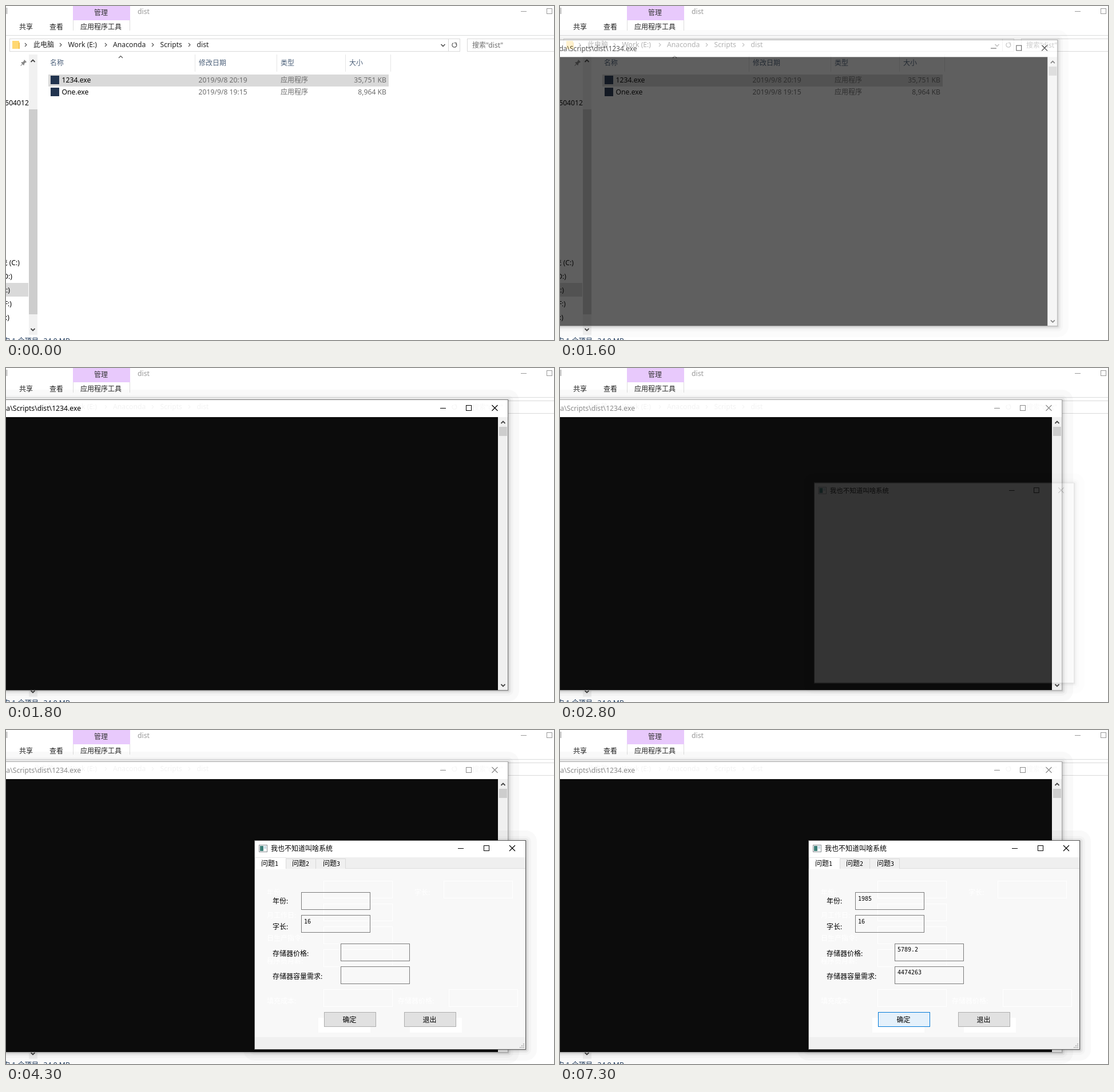
Animation, 958 px wide and 585 px high, one loop 8000 ms. Source, as an HTML page:

```html
<!DOCTYPE html>
<html lang="zh-CN">
<head>
<meta charset="utf-8">
<title>Desktop</title>
<style>
html, body { margin: 0; width: 100%; height: 100%; overflow: hidden; background: #fff; }
svg { display: block; width: 958px; height: 585px; font: 12.2px "Noto Sans", "Noto Sans CJK SC", "Noto Sans CJK", sans-serif; }
text { white-space: pre; }
.cn { font-size: 12px; font-family: "Noto Sans CJK SC", "Noto Sans CJK", sans-serif; }
.mono { font-size: 10px; font-family: "DejaVu Sans Mono", "Noto Sans Mono", monospace; }
</style>
</head>
<body>
<svg id="stage" viewBox="0 0 958 585"></svg>
<script>
const LOOP = 8000;

// ---- drawing helpers ----
const rect = (x, y, w, h, fill, extra = '') =>
  `<rect x="${x}" y="${y}" width="${w}" height="${h}" fill="${fill}" ${extra}/>`;
const box = (x, y, w, h, stroke, fill = 'none', extra = '') =>
  rect(x + .5, y + .5, w, h, fill, `stroke="${stroke}" ${extra}`);
const text = (x, y, s, fill = '#000', extra = '') =>
  `<text x="${x}" y="${y}" fill="${fill}" ${extra}>${s}</text>`;
const cn = (x, y, s, fill) => text(x, y, s, fill, 'class="cn"');
const mono = (x, y, s, extra = '') => text(x, y, s, '#000', `class="mono" ${extra}`);
const end = (x, y, s, fill) => text(x, y, s, fill, 'text-anchor="end"');
const line = (d, stroke, width = 1) =>
  `<path d="${d}" fill="none" stroke="${stroke}" stroke-width="${width}"/>`;
const group = (id, body, extra = '') => `<g id="${id}" ${extra}>${body}</g>`;

const chevrons = { right: 'm-2 -3l3 3l-3 3', up: 'm-3.5 2l3.5 -3.5l3.5 3.5', down: 'm-3.5 -2l3.5 3.5l3.5 -3.5' };
const chevron = (x, y, dir, color = '#555', width = 1.2) => line(`M${x} ${y}${chevrons[dir]}`, color, width);

// Soft shadow built from stacked rounded rings around a window
function ring(x, y, w, h, d, alpha) {
  const arc = (dx, dy) => `a${d} ${d} 0 0 1 ${dx} ${dy}`;
  return `<path fill-rule="evenodd" opacity="${alpha}" d="M${x} ${y - d + 2}h${w}${arc(d, d)}v${h - 2}` +
    `${arc(-d, d)}h${-w}${arc(-d, -d)}v${2 - h}${arc(d, -d)}zM${x} ${y}h${w}v${h}h${-w}z"/>`;
}
const shadow = (...frame) => '<g>' +
  [[19, .023], [9, .025], [5, .05], [2, .11]].map(layer => ring(...frame, ...layer)).join('') + '</g>';

// Minimise, maximise and close; each x is the left edge of its glyph
const controls = (y, min, max, close) =>
  `<g fill="none" stroke="currentColor"><path d="M${min} ${y + .5}h10"/>` +
  `<rect x="${max + .5}" y="${y - 4.5}" width="9" height="9"/>` +
  (close ? `<path d="M${close} ${y - 5}l10 10m0 -10l-10 10" stroke-width="1.2"/>` : '') + '</g>';

// ---- file browser ----
function fileRow(y, name, date, size) {
  return rect(78, y + 2, 15, 15, '#22344f') + text(97.5, y + 14, name) +
    text(336.5, y + 14, date, '#6d6d6d') + cn(480, y + 14, '应用程序', '#6d6d6d') +
    end(665, y + 14, size, '#6d6d6d');
}

function browser() {
  const ribbon = rect(117, 0, 100, 25, '#e8c9fc') + cn(154, 16, '管理', '#333') +
    line('M117.5 25v18M216.5 25v18', '#ddd') + line('M1.5 3v11', '#888') +
    cn(23, 41, '共享', '#222') + cn(76, 41, '查看', '#222') + cn(130, 41, '应用程序工具', '#222') +
    line('M0 51.5H958', '#dadbdc');
  const crumbs = [[108.5, 'Work (E:)'], [187, 'Anaconda'], [269.5, 'Scripts'], [333.5, 'dist']];
  const path = cn(48, 72, '此电脑', '#222') + crumbs.map(([x, s]) => text(x, 72, s, '#222')).join('') +
    [35, 96, 175, 257, 321].map(x => chevron(x, 68, 'right')).join('');
  const search = cn(815, 73, '搜索', '#6d6d6d') + text(839, 73, '"dist"', '#6d6d6d') +
    chevron(764, 69, 'down', '#555', 1.6) +
    line('M786.5 65.2a4 4 0 1 1 -4.5 -.5M783.5 64.5h3.5v3.5', '#555', 1.2);
  const address = box(6, 57, 787, 22, '#d9d9d9') + line('M773.5 58v21', '#d9d9d9') +
    box(806, 57, 160, 22, '#d9d9d9') + rect(11, 61, 12, 14, '#ffd873') + rect(22, 64, 2, 11, '#f3c24f') +
    group('address', path + search);
  const heads = [[77, '名称'], [337, '修改日期'], [480, '类型'], [600, '大小']];
  const header = heads.map(([x, s]) => cn(x, 104, s, '#4c607a')).join('') +
    line('M330.5 85v30M473.5 85v30M593.5 85v30M672.5 85v30', '#e5e5e5') + chevron(200.5, 89, 'up');
  const drives = [[24, 454, '系统 (C:)'], [11, 478, '(D:)'], [7, 502, '(E:)'], [10, 526, '(F:)'], [6, 550, '(G:)']];
  const nav = rect(40, 85, 15, 491, '#f1f1f1') + rect(40, 181, 15, 359, '#cdcdcd') +
    chevron(47, 96, 'up', '#444', 1.8) + chevron(47, 567, 'down', '#444', 1.8) +
    '<path d="M32 94l4 4l-1 1l-1 0l-2 2l0 2l-1 1l-2 -2l-3 3l-.7 -.7l3 -3l-2 -2l1 -1l2 0l2 -2l0 -1z" fill="#888"/>' +
    rect(0, 485, 39, 24, '#d9d9d9') + end(40, 174, '504012') +
    drives.map(([x, y, s]) => end(x, y, s)).join('');
  const status = text(-5, 591, '中 1 个项目', '#1e395b') + text(65.5, 591, '34.9 MB', '#1e395b');
  return rect(0, 0, 958, 585, '#fff') + ribbon +
    group('browserTitle', text(230, 14, 'dist', 'currentColor') + controls(9, 900, 945)) +
    address + header +
    group('selected', box(74, 120, 594, 20, 'currentColor')) +
    group('hovered', rect(74, 141, 595, 21, '#e5f3ff')) +
    fileRow(120, '1234.exe', '2019/9/8 20:19', '35,751 KB') +
    fileRow(141, 'One.exe', '2019/9/8 19:15', '8,964 KB') + nav + status;
}

// ---- console ----
function consoleWindow() {
  const body = rect(-156, 55, 1034, 510, '#fff') +
    group('addressTrace', '<use href="#address"/>', 'opacity=".05"') +
    group('consoleTitle', end(131, 75, 'E:\\Anaconda\\Scripts\\dist\\1234.exe', 'currentColor') +
      controls(70, 759, 804, 849.5)) +
    rect(-156, 86, 1016, 478, '#0c0c0c') + rect(860, 86, 17, 478, '#f0f0f0') +
    rect(862, 103, 14, 16, '#cdcdcd') + chevron(869, 95, 'up', '#444', 1.8) +
    chevron(869, 556, 'down', '#444', 1.8) + box(-156, 55, 1033, 509, '#777', 'none', 'id="consoleEdge"');
  return shadow(-156, 55, 1034, 510) + `<g>${body}</g>`;
}

// ---- dialog ----
const field = (x, y, id = '') => box(x, y, 120, 30, '#7a7a7a', 'none', id && `id="${id}"`);
const button = (x, y, label, id = '') =>
  box(x, y, 90, 25, '#adadad', '#e1e1e1', id && `id="${id}"`) + cn(x + 32.5, y + 18, label);

function tabs(edges, active) {
  return edges.slice(0, 3).map((x, i) => {
    const on = i === active, top = on ? 223 : 225, w = edges[i + 1] - x;
    return rect(x, top, w, (on ? 244 : 243) - top, on ? '#fff' : '#f0f0f0') +
      line(`M${x + .5} 243V${top + .5}H${x + w + .5}V243`, on ? '#e6e6e6' : '#d9d9d9') +
      cn(446 + i * 54, 238, '问题') + mono(470 + i * 54, 238, i + 1);
  }).join('');
}

const labels = list => list.map(([x, y, s]) => cn(x, y, s + ':')).join('');

function costForm() {
  return labels([[456, 289, '年份'], [456, 329, '月工作日'], [456, 369, '日生产指令'], [456, 409, '程序员月薪'],
    [456, 479, '填充成本'], [714, 289, '字长'], [685, 479, '存储器价格']]) +
    [264, 304, 344, 384, 454].map(y => field(555, y)).join('') + field(765, 264) + field(774, 454) +
    button(546, 504, '确定') + button(706, 504, '退出');
}

// Pale leftover of the previous form behind the current one
const costTrace = () => costForm().replace(/#(000|7a7a7a|adadad|e1e1e1)/g, '#fff');

function memoryForm() {
  return labels([[466, 304, '年份'], [466, 349, '字长'], [466, 396, '存储器价格'], [466, 436, '存储器容量需求']]) +
    field(516, 284, 'yearField') + field(516, 324) + field(585, 374) + field(585, 414) +
    mono(521, 299, '', 'id="year"') + rect(521, 289, 1, 12, '#000', 'id="caret"') + mono(521, 339, '16') +
    group('results', mono(590, 388, '5789.2') + mono(590, 428, '4474263')) +
    button(556, 494, '确定', 'okButton') + button(696, 494, '退出');
}

function dialog() {
  let grip = '';
  for (let r = 0; r < 3; r++) for (let c = 0; c <= r; c++) grip += rect(904 - c * 3, 549 + r * 3, 2, 2, '#bbb');
  const body = rect(434, 193, 475, 367, '#fff') +
    box(442, 201, 14, 12, '#8a8f94', '#fff') + rect(444, 203, 6, 9, '#3c7f78') + rect(451, 203, 4, 5, '#c9dde6') +
    cn(463, 212, '我也不知道叫啥系统') + controls(207, 790, 835, 880) +
    group('pages', rect(435, 223, 473, 20, '#efefef') + rect(435, 243, 473, 295, '#f8f8f8') +
      line('M435 242.5H908', '#dedede') + rect(435, 538, 473, 21, '#f0f0f0') + grip +
      group('costPage', tabs([436, 487, 540, 595], 2) + costForm()) +
      group('memoryPage', tabs([435, 489, 541, 593], 0) + costTrace() + memoryForm())) +
    box(434, 193, 474, 366, '#555');
  return shadow(434, 193, 475, 367) + `<g>${body}</g>`;
}

const stage = document.getElementById('stage');
stage.innerHTML = browser() + group('console', consoleWindow()) + group('dialog', dialog());
const el = {};
stage.querySelectorAll('[id]').forEach(node => el[node.id] = node);

// ---- timing ----
const show = (node, on) => node.setAttribute('display', on ? 'inline' : 'none');
const paint = (node, fill, stroke) => {
  if (fill) node.setAttribute('fill', fill);
  if (stroke) node.setAttribute('stroke', stroke);
};
const within = (t, a, b) => t >= a && t < b;

// Window opening: one [scale, opacity] pose per 100 ms; the shadow fades in sooner
function open(node, t, start, poses, cx, cy) {
  show(node, t >= start);
  if (t < start) return;
  const [s, a] = poses[Math.min(poses.length - 1, Math.floor((t - start) / 100))];
  node.setAttribute('transform', `translate(${cx} ${cy}) scale(${s}) translate(${-cx} ${-cy})`);
  node.firstElementChild.setAttribute('opacity', Math.sqrt(a));
  node.lastElementChild.setAttribute('opacity', a);
}

function typedYear(t) {
  const keys = [5500, 5700, 5800, 6000];
  return '1985'.slice(0, keys.filter(k => t >= k).length);
}

function update(t) {
  el.browserTitle.style.color = within(t, 1400, 1600) ? '#000' : '#999';
  show(el.hovered, within(t, 400, 700));
  const hot = within(t, 700, 1600);
  el.selected.style.color = hot ? '#99d1ff' : '#d9d9d9';
  paint(el.selected.firstChild, hot ? '#cce8ff' : '#d9d9d9');

  open(el.console, t, 1600, [[.985, .655], [.996, .93], [1, 1]], 361, 309.5);
  show(el.addressTrace, t >= 1800);
  const idle = t >= 2800;
  el.consoleTitle.style.color = idle ? '#8a8a8a' : '#000';
  paint(el.consoleEdge, null, idle ? '#aaa' : '#777');

  open(el.dialog, t, 2800, [[.958, .165], [.988, .75], [1, 1]], 671, 376);
  show(el.pages, t >= 2900);
  show(el.costPage, t < 4300);
  show(el.memoryPage, t >= 4300);

  const year = typedYear(t);
  const focused = within(t, 4800, 7200);
  el.year.textContent = year;
  el.caret.setAttribute('x', 521 + 6 * year.length);
  show(el.caret, focused && !within(t, 5200, 5500) && !within(t, 6200, 6700));
  paint(el.yearField, null, focused ? '#0078d7' : '#7a7a7a');
  const pressed = within(t, 7200, 7300);
  if (t < 7100) paint(el.okButton, '#e1e1e1', '#adadad');
  else paint(el.okButton, pressed ? '#cce4f7' : '#e5f1fb', pressed ? '#005499' : '#0078d7');
  show(el.results, t >= 7300);
}

const begin = performance.now();
function tick() {
  update((performance.now() - begin) % LOOP);
  requestAnimationFrame(tick);
}
tick();
</script>
</body>
</html>
```
